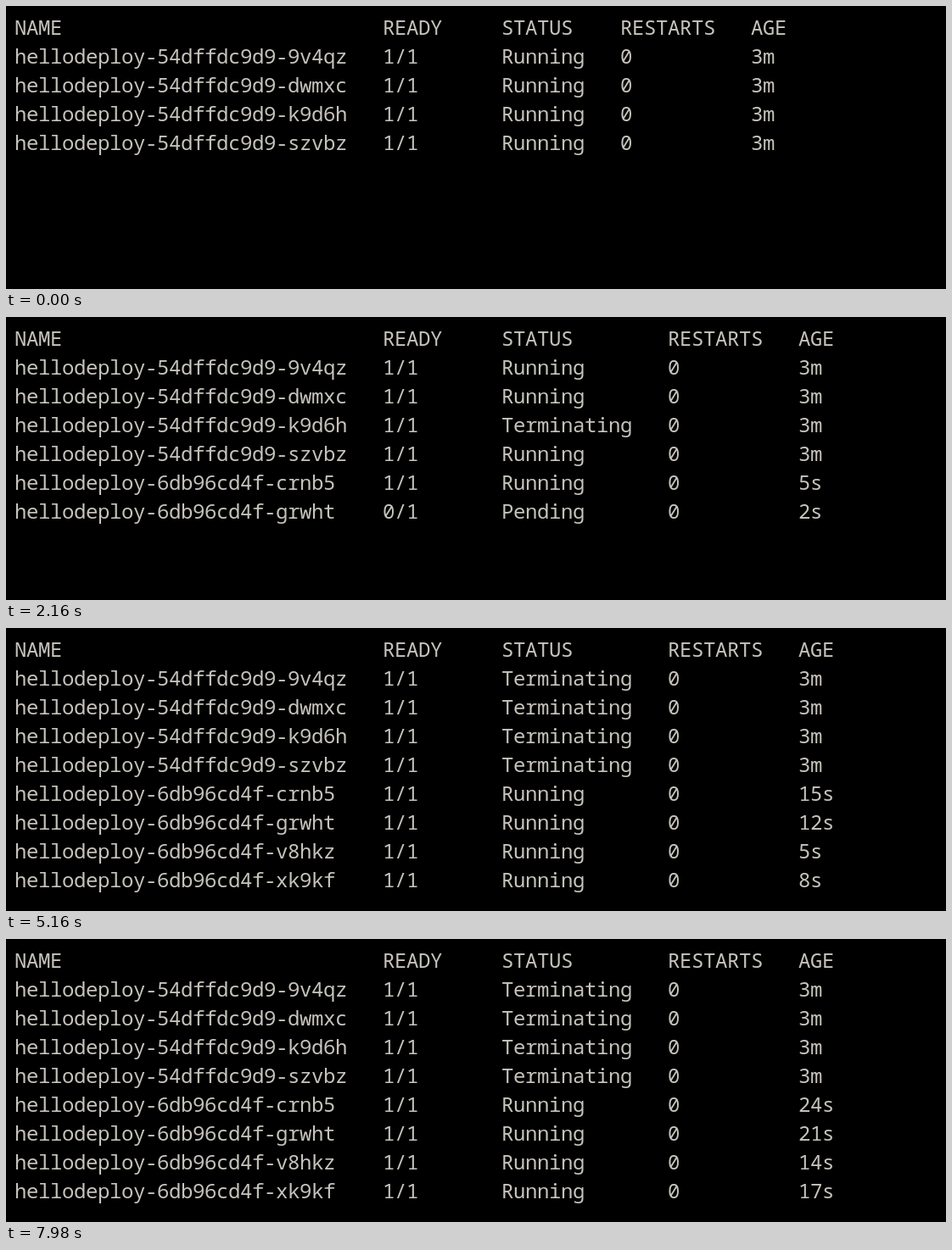
An HTML page that plays this animation: 1108 px wide and 334 px high, repeating every 8000 ms.

```html
<!DOCTYPE html>
<html lang="en">
<head>
<meta charset="utf-8">
<title>Rolling update</title>
<style>
  html, body { margin: 0; width: 100%; height: 100%; overflow: hidden; background: #000; }
  pre {
    margin: 0;
    padding: 8px 0 0 10px;
    color: #c6c3bc;
    font: 24px/34px "Noto Sans Mono", "DejaVu Sans Mono", monospace;
    letter-spacing: -0.4px;
    font-variant-ligatures: none;
  }
</style>
</head>
<body>
<pre id="screen"></pre>
<script>
const LOOP = 8000;
const FIRST = 1320;        // first refresh that shows a new pod
const REFRESH = 700;
const SECONDS = 2.333;     // pod time between two refreshes

// stop: refresh at which the old pod starts terminating
const oldPods = [
  { id: '9v4qz', stop: 2 },
  { id: 'dwmxc', stop: 4 },
  { id: 'k9d6h', stop: 1 },
  { id: 'szvbz', stop: 5 },
];

// born: seconds after the first new pod; states: status at its first refreshes
const newPods = [
  { id: 'crnb5', born: 0, shown: 0, states: ['ContainerCreating'] },
  { id: 'grwht', born: 3, shown: 1, states: ['Pending'] },
  { id: 'v8hkz', born: 10, shown: 4, states: ['ContainerCreating'] },
  { id: 'xk9kf', born: 7, shown: 2, states: ['Pending', 'ContainerCreating'] },
];

function podRows(step) {
  const clock = Math.floor(3.467 + step * SECONDS);
  const before = oldPods.map(({ id, stop }) =>
    ['hellodeploy-54dffdc9d9-' + id, '1/1', step < stop ? 'Running' : 'Terminating', '0', '3m']);
  const after = newPods.filter(pod => step >= pod.shown).map(({ id, born, shown, states }) => {
    const status = states[step - shown] || 'Running';
    const ready = status === 'Running' ? '1/1' : '0/1';
    return ['hellodeploy-6db96cd4f-' + id, ready, status, '0', clock - born + 's'];
  });
  return [...before, ...after];
}

function table(step) {
  const rows = podRows(step);
  const statusWidth = Math.max(...rows.map(row => row[2].length)) + 3;
  const widths = [31, 10, statusWidth, 11, 0];
  return [['NAME', 'READY', 'STATUS', 'RESTARTS', 'AGE'], ...rows]
    .map(row => row.map((cell, i) => cell.padEnd(widths[i])).join(''))
    .join('\n');
}

const screen = document.getElementById('screen');
const start = performance.now();
let current;

function draw() {
  const time = (performance.now() - start) % LOOP;
  const step = Math.max(-1, Math.floor((time - FIRST) / REFRESH));
  if (step !== current) {
    current = step;
    screen.textContent = table(step);
  }
  requestAnimationFrame(draw);
}
draw();
</script>
</body>
</html>
```
